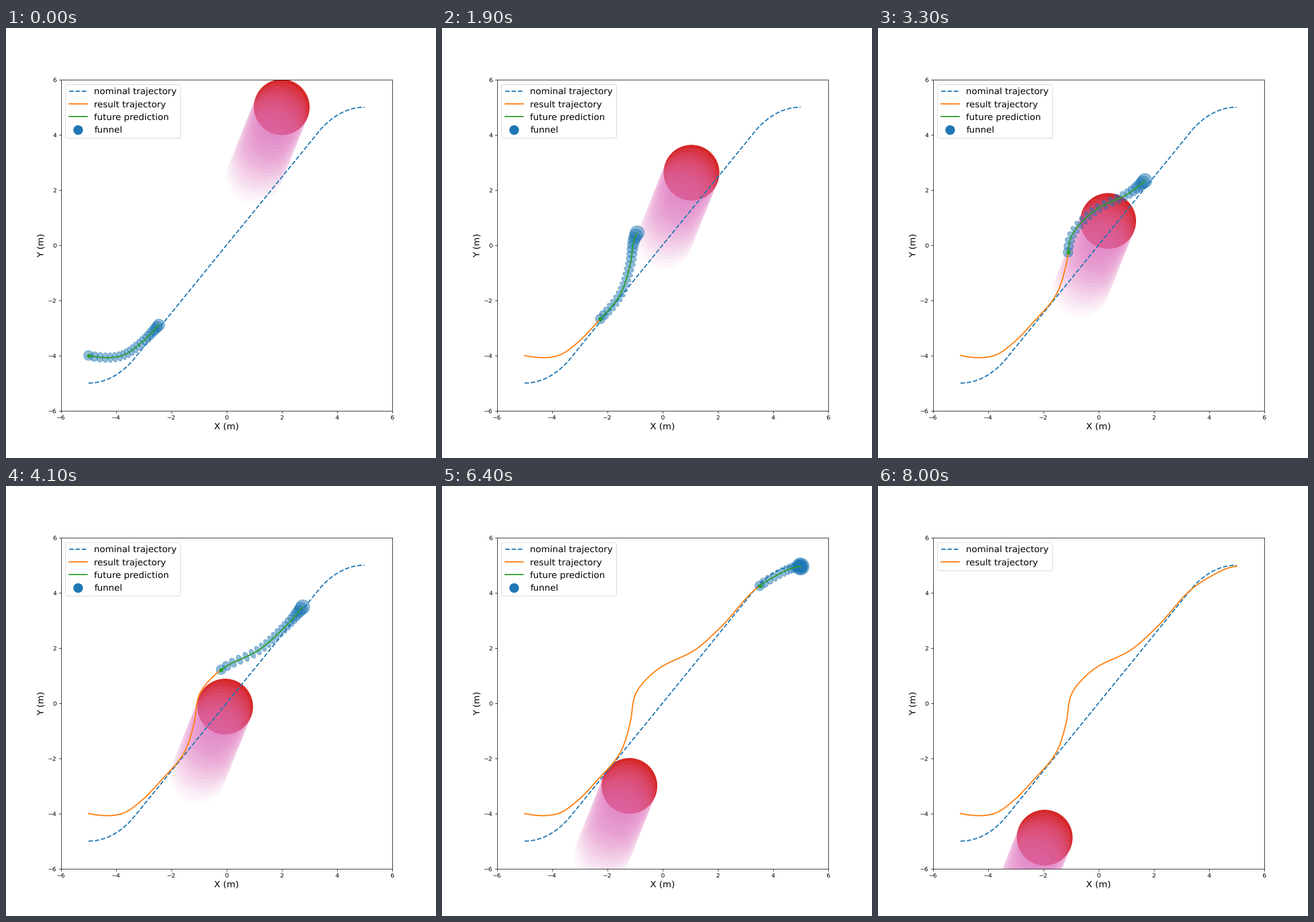
Recreate the animation shown at these times as a matplotlib script. Size 748x748 px, loop 8100 ms.

```python
import numpy as np
import matplotlib.pyplot as plt
from matplotlib.animation import FuncAnimation
from matplotlib.lines import Line2D
from matplotlib.patches import Circle, Ellipse

plt.rcParams["text.hinting"] = "none"
STEPS, HORIZON, PX = 80, 20, 48.0  # PX: pixels per metre

# Key points of the driven path: step, x, y.
KEYS = np.array([
    (0, -5, -4), (6, -3.88, -4.03), (12, -3.11, -3.56), (18, -2.38, -2.81),
    (25, -1.52, -1.77), (31, -1.165, -0.68), (36, -0.96, 0.37), (41, -0.195, 1.213),
    (47, 1.14, 1.905), (53, 2.045, 2.69), (64, 3.524, 4.254), (70, 4.5, 4.82),
    (75, 4.91, 4.945), (80, 5, 4.953)])


def nominal(x):
    """Straight through the origin, bending level towards both ends."""
    bend = np.maximum(np.abs(x) - 3.364, 0) / 1.636
    return np.sign(x) * (1.23 * np.abs(x) - 1.15 * bend ** 1.75)


def driven(t):
    """Cubic Hermite curve through the key points."""
    knots, points = KEYS[:, 0], KEYS[:, 1:]
    slopes = np.gradient(points, knots, axis=0, edge_order=2)
    t = np.clip(t, 0, STEPS)
    i = np.clip(np.searchsorted(knots, t, side="right") - 1, 0, len(knots) - 2)
    h = (knots[i + 1] - knots[i])[:, None]
    u = (t - knots[i])[:, None] / h
    return ((1 + 2 * u) * (1 - u) ** 2 * points[i] + u * (1 - u) ** 2 * h * slopes[i]
            + u * u * (3 - 2 * u) * points[i + 1] + u * u * (u - 1) * h * slopes[i + 1])


def straight(t):
    """The plan before the obstacle is noticed: straight on after step 20."""
    return driven(np.minimum(t, 20)) + np.maximum(t - 20, 0)[:, None] * (0.131, 0.154)


k = np.arange(HORIZON + 1)
lead = k - 0.032 * np.maximum(k - 11, 0) ** 2  # the plan slows towards its end
result = driven(np.arange(STEPS + 1))


def prediction(step):
    t = step + lead
    noticed = np.clip((step - 12) / 6, 0, 1)
    return (1 - noticed) * straight(t) + noticed * driven(t)


def funnel_sizes(step):
    """Diameters along and across the path: round, then narrow, then round and large."""
    end = 20 + 4.5 * np.clip(step / 12, 0, 1) + 5.5 * np.clip((step - 53) / 11, 0, 1)
    s = k / HORIZON
    along = 8 + 9 * np.exp(-k / 1.8) + (end - 8) * s ** 4
    across = 17 + (end - 17) * s ** 5
    return along / PX, across / PX


def obstacle_at(step):
    return 2 - 0.05 * step, 5 - 0.125 * step


fig, ax = plt.subplots(figsize=(10, 10), dpi=74.8)
fig.subplots_adjust(left=0.1253, right=0.9003)
ax.set_xlim(-6, 6)
ax.set_ylim(-6, 6)
ax.set_aspect("equal")
ax.set_xlabel("X (m)", fontsize=15)
ax.set_ylabel("Y (m)", fontsize=15)

obstacle = ax.add_patch(Circle((2, 5), 1, color="tab:red"))
ghosts = [ax.add_patch(Circle((2, 5), 1, color="tab:pink", alpha=0.15 - 0.006 * j))
          for j in k[1:]]
funnel = [ax.add_patch(Ellipse((0, 0), 1, 1, color="tab:blue", alpha=0.5)) for _ in k]

xs = np.linspace(-5, 5, 160)
nominal_line, = ax.plot(xs, nominal(xs), "--", color="tab:blue", lw=2,
                        label="nominal trajectory")
result_line, = ax.plot([], [], color="tab:orange", lw=2, label="result trajectory")
future_line, = ax.plot([], [], color="tab:green", lw=2, label="future prediction")
robot, = ax.plot([], [], "o", color="tab:green", markersize=6)
funnel_key = Line2D([], [], lw=0, marker="o", markersize=15, color="tab:blue", label="funnel")

handles = [nominal_line, result_line, future_line, funnel_key]
full_legend = ax.legend(handles=handles, loc="upper left", fontsize=15)
ax.add_artist(full_legend)
short_legend = ax.legend(handles=handles[:2], loc="upper left", fontsize=15)


def update(step):
    driving = step < STEPS
    now = min(step, STEPS - 1)
    obstacle.center = obstacle_at(now)
    for j, ghost in enumerate(ghosts, 1):
        ghost.center = obstacle_at(now + j)

    result_line.set_data(*result[:step + 1].T)
    path = prediction(now)
    future_line.set_data(*path.T)
    robot.set_data(*path[:1].T)
    dx, dy = np.gradient(path, axis=0).T
    angles = np.degrees(np.arctan2(dy, dx))
    for ellipse, centre, along, across, angle in zip(funnel, path, *funnel_sizes(now), angles):
        ellipse.set(center=centre, width=along, height=across, angle=angle)

    for artist in (future_line, robot, full_legend, *funnel):
        artist.set_visible(driving)
    short_legend.set_visible(not driving)
    return []


anim = FuncAnimation(fig, update, frames=STEPS + 1, init_func=lambda: update(0),
                     interval=100, repeat=True, repeat_delay=0, blit=False)
plt.show()
```
